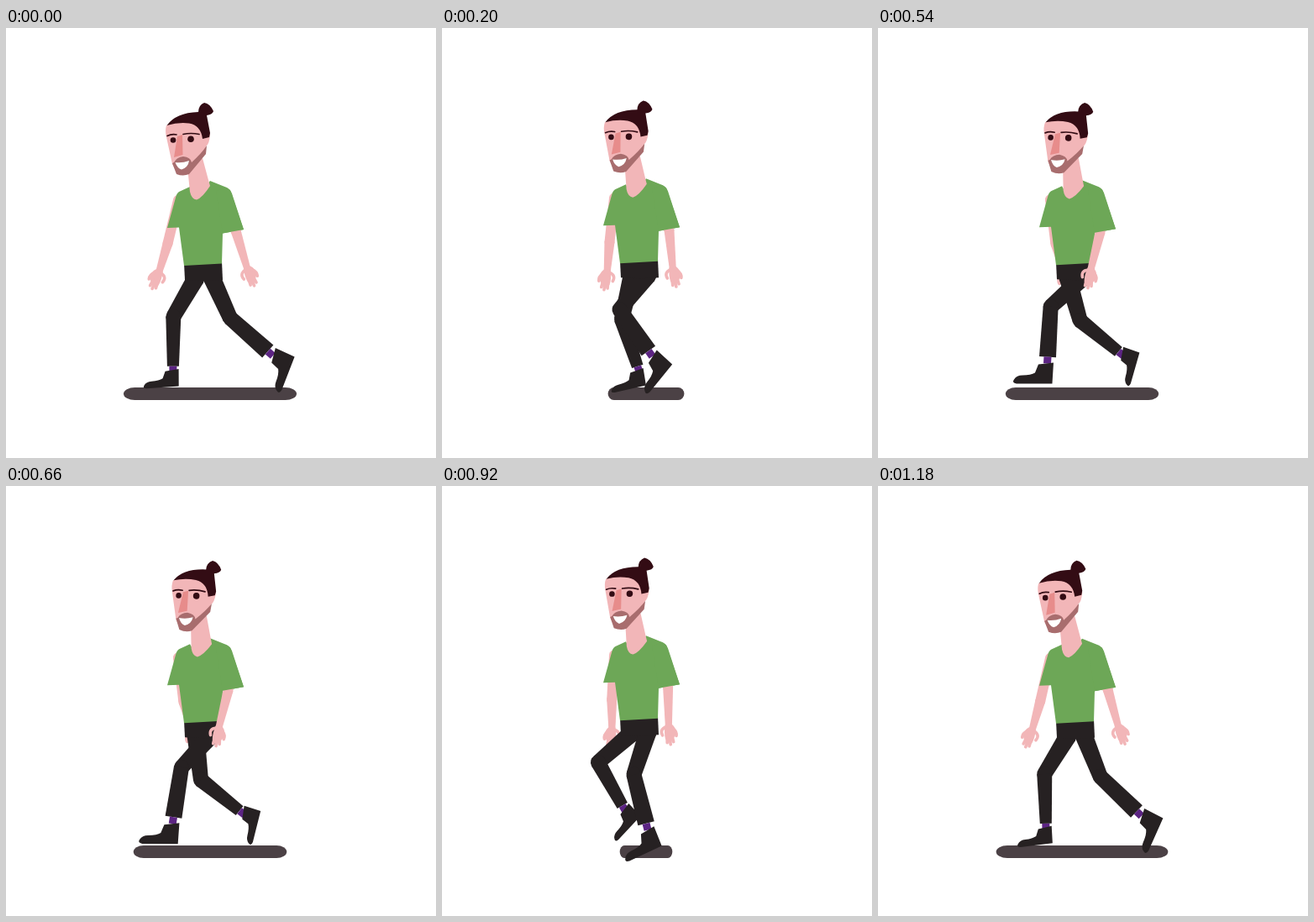
Animation of 512x512 px, one loop 1200 ms. Source, as an HTML page with a canvas:

```html
<!DOCTYPE html>
<html lang="en">
<head>
<meta charset="utf-8">
<title>Walk cycle</title>
<style>
  html, body { margin: 0; width: 100%; height: 100%; overflow: hidden; background: #fff; }
  canvas { display: block; }
</style>
</head>
<body>
<canvas id="stage" width="512" height="512"></canvas>
<script>
const ctx = document.getElementById('stage').getContext('2d');
const LOOP = 1200;
const DARK = '#262122', SKIN = '#f2b6b8', SHIRT = '#6da757', HAIR = '#330c14',
      BEARD = '#a86d6e', NOSE = '#e78c8b', SOCK = '#5c2483', SHADOW = '#4b4145';

// Joint angles in degrees from straight down, as [time, angle] keys
const FAR_LEG = {
  thigh: [[0, -30.3], [600, 21], [900, -50.5], [1200, -30.3]],
  shin: [[0, -0.5], [600, 56.5], [900, 31.5], [1200, -0.5]],
  boot: [[0, 4], [200, 13], [360, 34], [540, 74], [600, 79], [760, 71], [920, 47], [1200, 4]],
  hip: [226, 298], length: 59, cuff: 14, bootScale: [0.9, 0.82]
};
const NEAR_LEG = {
  thigh: [[0, 24.7], [200, -39], [300, -60], [600, -45], [760, -39.5], [920, -18.4], [1200, 24.7]],
  shin: [[0, 48.5], [200, 35], [360, 27], [540, -3.3], [600, -14], [760, -1], [920, 14], [1200, 48.5]],
  boot: [[0, 69], [200, 51], [360, 33], [540, 0], [600, -4], [760, 5], [920, 25], [1200, 69]],
  hip: [245, 297], length: 60, cuff: 20, bootScale: [1, 1]
};
const FAR_ARM = { shoulder: [205, 205], length: 53, upper: [-13.6, 9.2], lower: [-17, 20], forearm: 33, side: -1 };
const NEAR_ARM = { shoulder: [262, 200], length: 44, upper: [15.6, 2], lower: [17, -17.5], forearm: 44, side: 1 };
const SHADOW_WIDTH = [[0, 103], [310, 23.5], [600, 98.5], [890, 29.5], [1200, 103]];

const linear = p => p;
const smooth = p => (1 - Math.cos(Math.PI * p)) / 2;
const mix = ([a, b], p) => a + (b - a) * p;
const triangle = (t, period) => 1 - Math.abs(1 - 2 * (t % period) / period);

function at(keys, t, ease = linear) {
  const i = keys.findIndex(key => key[0] > t);
  const [t0, a] = keys[i - 1], [t1, b] = keys[i];
  return mix([a, b], ease((t - t0) / (t1 - t0)));
}

function fill(path, color) {
  ctx.fillStyle = color;
  ctx.fill(new Path2D(path));
}

function line(path, color, width) {
  ctx.strokeStyle = color;
  ctx.lineWidth = width;
  ctx.stroke(new Path2D(path));
}

function dot(x, y, r, color) {
  ctx.fillStyle = color;
  ctx.beginPath();
  ctx.arc(x, y, r, 0, 7);
  ctx.fill();
}

function joint(x, y, degrees) {
  ctx.translate(x, y);
  ctx.rotate(-degrees * Math.PI / 180);
}

function group(draw) {
  ctx.save();
  draw();
  ctx.restore();
}

function limb(length, start, end, color) {
  dot(0, 0, start / 2, color);
  fill(`M${-start / 2} 0H${start / 2}L${end / 2} ${length}H${-end / 2}Z`, color);
}

function drawLeg(leg, t) {
  const thigh = at(leg.thigh, t), shin = at(leg.shin, t), boot = at(leg.boot, t);
  group(() => {
    joint(...leg.hip, thigh);
    limb(53, 21, 18, DARK);
    joint(0, 53, shin - thigh);
    limb(leg.length, 18, leg.cuff, DARK);
    fill(`M-4.5 ${leg.length}h9v8h-9Z`, SOCK);
    joint(0, leg.length - (leg === FAR_LEG ? 2 : 0), boot - shin);
    ctx.scale(...leg.bootScale);
    fill('M-11 9L7 7L5.5 32L-37 32Q-43 31 -40 27Q-37 22 -30 22Q-20 22 -15 19Z', DARK);
  });
}

function drawArm(arm, swing) {
  const upper = mix(arm.upper, swing), lower = mix(arm.lower, swing);
  group(() => {
    joint(...arm.shoulder, upper);
    limb(arm.length, 12, 12, SKIN);
    joint(0, arm.length, lower - upper);
    limb(arm.forearm + 2, 12, 8, SKIN);
    ctx.translate(0, arm.forearm);
    ctx.scale(arm.side, 1);
    fill('M-4 0L4 0Q10 5 8 13L5 18L-4 18Q-6 10 -4 0Z', SKIN);
    line('M-3 3Q-11 6 -7.5 13M-2 15L-2 22M1 15L2 24M4 14L5.5 21M5 5Q10 9 9 14', SKIN, 3.6);
  });
}

function drawHead(swing) {
  group(() => {
    joint(231, 215, -5.1 * swing);
    ctx.translate(-231, -215);
    fill('M216 165L219 195Q221 204 227 204.500Q234 202 243 188L241 181L234 155Z', SKIN);
    fill('M191 116Q189 122 191 130L198 162L204 173H217L237 146L238 141Q242 139 243 127L238 110L215 106Z', SKIN);
    fill('M204 129L210 127L210.500 151L200 154Z', NOSE);
    fill('M198 161L203 174Q211 177 218 174L238 150L239 140Q233 149 221 160Q220 154 211 153Q203 154 200 160Z', BEARD);
    fill('M201.500 160Q210 161 218 158Q217 166 209 168.500Q204 167 201.500 160Z', '#fff');
    fill('M191.500 116Q202 101 229 100Q229 92 236 89Q243 90 247 99Q246 103 239 104L243 125L242 130L234 132Q232 116 218 113.500Q205 112 191.500 116Z', HAIR);
    line('M192 128.500Q197 126 203 127M211 126.500Q220 124.500 230 126.500', HAIR, 1.7);
    dot(199, 133.5, 3.3, HAIR);
    dot(220, 132.3, 3.8, HAIR);
  });
}

function drawShadow(t) {
  const half = at(SHADOW_WIDTH, t, smooth);
  ctx.fillStyle = SHADOW;
  ctx.beginPath();
  ctx.roundRect(243 - half, 428, half * 2, 15, { x: 2 + half * 0.11, y: 7.5 });
  ctx.fill();
}

function draw(t) {
  const swing = triangle(t, LOOP);
  ctx.clearRect(0, 0, 512, 512);
  drawShadow(t);
  group(() => {
    ctx.translate(0, -4 * triangle(t, LOOP / 2));
    drawArm(FAR_ARM, swing);
    drawLeg(FAR_LEG, t);
    drawLeg(NEAR_LEG, t);
    fill('M212 280L257 278L258 300L236 301L213 300Z', DARK);
    fill('M219 189L206 195Q203 197 202 202L192 238L206 237.500L212 283L257 280.500L258 244.500L283 240L269 197Q267 192 263 190L243 182L227 203Z', SHIRT);
    drawArm(NEAR_ARM, swing);
    fill('M250 194L262 190L267 193L283 240L258 244.500Z', SHIRT);
    drawHead(swing);
  });
}

ctx.lineCap = 'round';
function frame() {
  draw(performance.now() % LOOP);
  requestAnimationFrame(frame);
}
frame();
</script>
</body>
</html>
```
